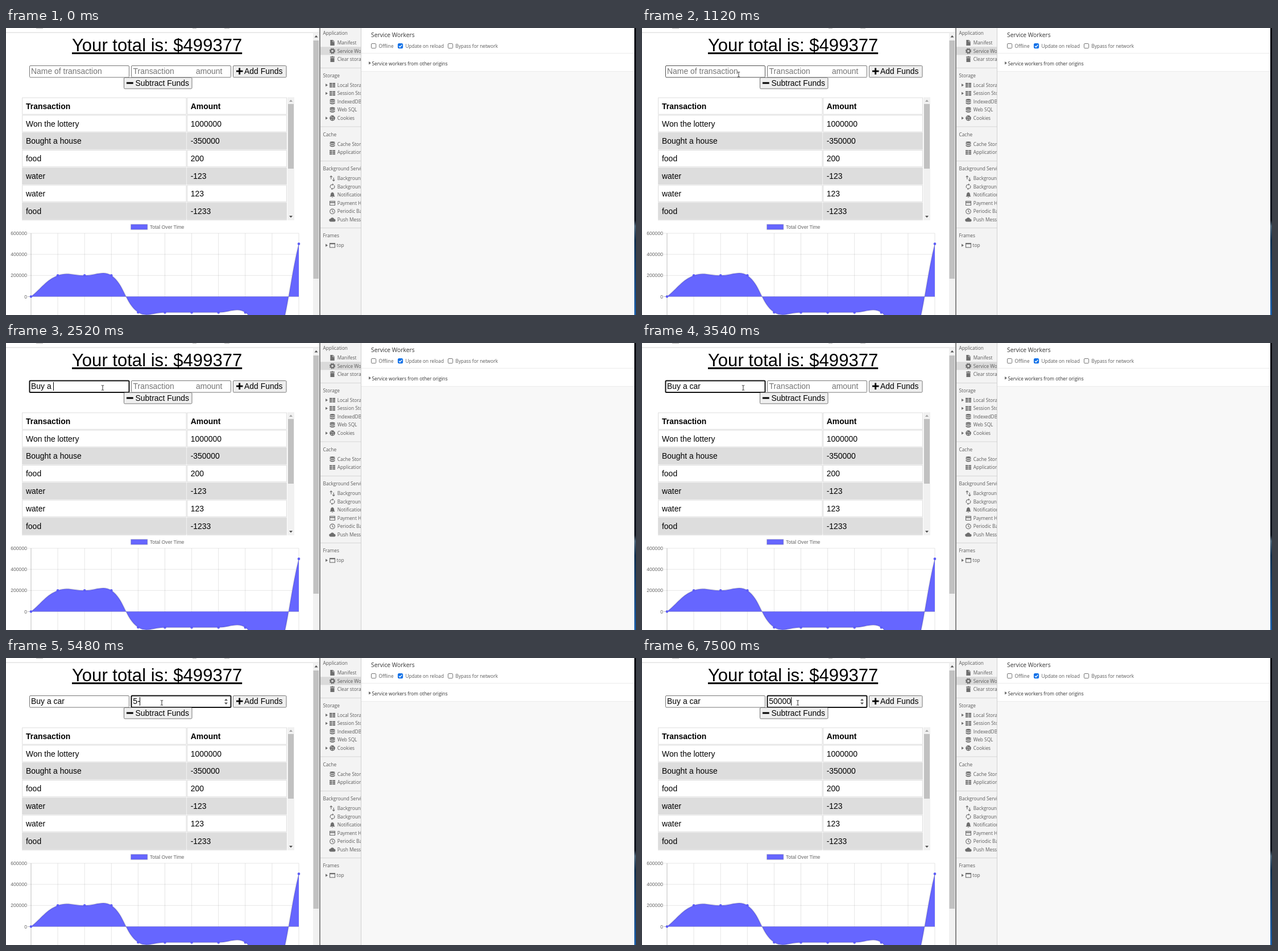
Animation of 1108 by 506 pixels, one loop 8000 ms. Source, as an HTML page:

```html
<!DOCTYPE html>
<html lang="en">
<head>
<meta charset="utf-8">
<title>Budget tracker</title>
<style>
html, body { margin: 0; width: 100%; height: 100%; overflow: hidden; background: #fff; }
svg { display: block; width: 1108px; height: 506px; }
text { font: 13.95px "Liberation Sans", Arial, sans-serif; white-space: pre; }
.title { font-size: 31.05px; text-decoration: underline; }
.bold { font-weight: bold; }
.hint { fill: #757575; }
.chart { font-size: 8.65px; fill: #666; }
.tool { font: 8.3px "Open Sans", "Noto Sans", sans-serif; fill: #5a5a5a; }
.dark { fill: #333; }
.head { font-size: 10.3px; fill: #333; }
.icon { fill: #6e6e6e; }
.line { fill: none; stroke: #6e6e6e; stroke-width: 1.1; }
.box { fill: #fff; stroke: #767676; }
.button { fill: #efefef; stroke: #767676; }
</style>
</head>
<body>
<svg viewBox="0 0 1108 506" xmlns="http://www.w3.org/2000/svg">
  <defs>
    <clipPath id="sideClip"><rect x="553" width="71" height="506"/></clipPath>
    <linearGradient id="desk" x2="0" y2="1">
      <stop offset="0" stop-color="#0b0d14"/><stop offset=".67" stop-color="#10151f"/>
      <stop offset=".69" stop-color="#4c6478"/><stop offset=".74" stop-color="#12304f"/>
      <stop offset="1" stop-color="#1d5fa8"/>
    </linearGradient>
  </defs>

  <rect width="1108" height="506" fill="#fff"/>
  <path d="M0 8h551" stroke="#d4d4d4"/>
  <path d="M53 0h12M328 0h7M384 0h9" stroke="#777"/>
  <text class="title" x="116" y="41">Your total is: $499377</text>

  <rect class="box" id="box1" x="41.5" y="66.5" width="175" height="20.5" rx="1.5"/>
  <rect class="box" id="box2" x="220.5" y="66.5" width="175" height="20.5" rx="1.5"/>
  <text class="hint" id="hint1" x="44" y="81.3">Name of transaction</text>
  <g class="hint" id="hint2"><text x="223.5" y="81.3">Transaction</text><text x="334" y="81.3">amount</text></g>
  <text id="field1" x="44" y="81.3"></text>
  <text id="field2" x="223.3" y="81.3"></text>
  <path id="spin" d="M384 75.2l3-3.4 3 3.4zM384 78.6l3 3.4 3-3.4z" fill="#505050"/>
  <rect class="button" x="399.5" y="66.5" width="93.5" height="20.5" rx="1.5"/>
  <rect class="button" x="207.5" y="87.5" width="119.5" height="19.5" rx="1.5"/>
  <path d="M405 76.2h11.5M410.7 70.5v11.5M212 97h11.7" stroke="#000" stroke-width="2.8"/>
  <text x="419" y="81.3">Add Funds</text>
  <text x="227.5" y="102.3">Subtract Funds</text>

  <g id="table"></g>
  <rect x="495" y="122" width="12" height="217" fill="#f1f1f1"/>
  <rect id="thumb1" x="496" y="134" width="10" height="114"/>
  <path d="M498 130l3-3.4 3 3.4z" fill="#a3a3a3"/>
  <path d="M498 331l3 3.4 3-3.4z" fill="#505050"/>

  <g id="chart"></g>

  <rect x="540" y="8.5" width="11" height="498" fill="#f1f1f1"/>
  <rect id="thumb2" x="540.5" y="22" width="9.5" height="420"/>
  <path d="M542.5 16.5l3-3.5 3 3.5z" fill="#505050"/>

  <rect x="551" width="2" height="506" fill="#858585"/>
  <rect x="553" width="71" height="506" fill="#f3f3f3"/>
  <g id="side" clip-path="url(#sideClip)"></g>
  <rect x="625" y="77" width="480" height="429" fill="#f8f8f8"/>
  <path d="M624.5 0v506" stroke="#d0d0d0"/>
  <path d="M625 44.5h480M625 76.5h480" stroke="#ececec"/>
  <text class="tool head" x="642" y="16">Service Workers</text>
  <g id="checks"></g>
  <path class="icon" d="M638 59l4 2.7-4 2.7z"/>
  <text class="tool dark" x="643.5" y="65.6">Service workers from other origins</text>
  <rect x="1105" width="3" height="506" fill="url(#desk)"/>

  <circle id="click" r="9" fill="#fff04a" style="mix-blend-mode:multiply"/>
  <path id="caret" d="M0 69v15" stroke="#000"/>
  <g id="pointer">
    <path data-kind="arrow" d="M0 0v12l2.8-2.6 1.9 4.3 1.9-.8-1.9-4.2h3.8z" fill="#fff" stroke="#000" stroke-width=".8"/>
    <path data-kind="beam" d="M-2.2 -4.2h1.7l.5 .5 .5-.5h1.7M0 -4v8M-2.2 4.2h1.7l.5-.5 .5 .5h1.7" fill="none" stroke="#333" stroke-width="1"/>
    <path data-kind="resize" d="M-7 0l3-3v2h8v-2l3 3-3 3v-2h-8v2z" fill="#000" stroke="#fff" stroke-width=".6"/>
  </g>
</svg>
<script>
const $ = id => document.getElementById(id);
const label = (cls, x, y, s, extra = '') => `<text class="${cls}" x="${x}" y="${y}" ${extra}>${s}</text>`;

// Transactions
const rows = [['Transaction', 'Amount'], ['Won the lottery', '1000000'], ['Bought a house', '-350000'],
  ['food', '200'], ['water', '-123'], ['water', '123'], ['food', '-1233']];
$('table').innerHTML = rows.map(([name, amount], i) => {
  const y = 123 + i * 30.83, fill = i && i % 2 === 0 ? '#ddd' : '#fff', cls = i ? '' : 'bold';
  const cell = (x, w) => `<rect x="${x}" y="${y}" width="${w}" height="29.2" fill="${fill}" stroke="#ddd"/>`;
  return cell(28.7, 288.3) + cell(318.7, 174.8) + label(cls, 35, y + 19.7, name) + label(cls, 324.7, y + 19.7, amount);
}).join('') + '<path d="M28 338.5h289M318 338.5h176" stroke="#ddd"/>';

// Area chart with tension-0.4 spline
const colX = i => 44 + i * 47.1, rowY = v => 473.5 - v / 200000 * 37.2;
const totals = [0, 200000, 200000, 200200, -149590, -150823, -150700, -150823, -150623, -500623, 499377];
const pts = totals.map((v, i) => [colX(i), rowY(v)]);
const ctrl = pts.map((p, i) => {
  const a = pts[i - 1] || p, b = pts[i + 1] || p;
  const da = Math.hypot(p[0] - a[0], p[1] - a[1]), db = Math.hypot(b[0] - p[0], b[1] - p[1]);
  const at = k => [0, 1].map(j => p[j] + .4 * k / (da + db) * (b[j] - a[j]));
  return [at(-da), at(db)];
});
const curve = `M${pts[0]}` + pts.slice(1).map((p, i) => `C${ctrl[i][1]} ${ctrl[i + 1][0]} ${p}`).join('');
let chart = '';
for (let i = 0; i < 11; i++) chart += `<path d="M${colX(i)} 362V506" stroke="#000" stroke-opacity="${i ? .1 : .25}"/>`;
[600000, 400000, 200000, 0].forEach(v => {
  const y = rowY(v);
  chart += `<path d="M38 ${y}H515" stroke="#000" stroke-opacity="${v ? .1 : .25}"/>` + label('chart', 37, y + 3, v, 'text-anchor="end"');
});
chart += `<path d="${curve}V473.5H44z" fill="#66f"/><path d="${curve}" fill="none" stroke="#000" stroke-opacity=".1" stroke-width="2.2"/>`;
chart += pts.map(([x, y]) => `<circle cx="${x}" cy="${y}" r="2.3" fill="#5c5cf6"/>`).join('');
chart += '<rect x="219.7" y="346.3" width="29" height="9" fill="#66f" stroke="#000" stroke-opacity=".1" stroke-width="2"/>';
$('chart').innerHTML = chart + label('chart', 253, 353.6, 'Total Over Time');

// Tool sidebar; icons are drawn around their centre
const grid = '<path class="icon" d="M-5-4h4.6v2.2h-4.6zM.4-4h4.6v2.2h-4.6zM-5-1.1h4.6v2.2h-4.6zM.4-1.1h4.6v2.2h-4.6zM-5 1.8h4.6v2.2h-4.6zM.4 1.8h4.6v2.2h-4.6z"/>';
const stack = '<ellipse class="icon" cy="-3.2" rx="4.5" ry="1.7"/><path class="icon" d="M-4.5-2q4.5 3 9 0v2q-4.5 3-9 0zM-4.5 1.2q4.5 3 9 0v2q-4.5 3-9 0z"/>';
const icons = {
  file: '<path class="icon" d="M-3.7-5h4.7l2.7 2.8v7.2h-7.4z"/><path d="M.8-4.4v2.7h2.7" fill="none" stroke="#f3f3f3" stroke-width=".7"/>',
  gear: '<circle r="3" fill="none" stroke="#6e6e6e" stroke-width="2.2"/><circle r="4.5" fill="none" stroke="#6e6e6e" stroke-width="1.4" stroke-dasharray="2 1.53"/>',
  bin: '<path class="icon" d="M-4-4.5h2.3l.7-.8h2l.7 .8h2.3v1.3h-8zM-3.5-2.4h7v7.4h-7z"/>',
  grid, stack,
  cookie: '<circle class="icon" r="4.8"/><path d="M-2-2h.1M1.5 2h.1M-1.7 2h.1M1 -1h.1M3.5-3.5h.1" stroke="#f3f3f3" stroke-width="1.6" stroke-linecap="round"/>',
  swap: '<path class="line" d="M-2.2 1.5v-6M-4.2-2.4l2-2 2 2M2.2-1.5v6M.2 2.4l2 2 2-2"/>',
  sync: '<path class="line" d="M-3.2 2.2A3.8 3.8 0 0 1 .5-3.7M3.2-2.2A3.8 3.8 0 0 1-.5 3.7"/><path class="icon" d="M0-5.6l2.6 1.9-2.6 1.9zM0 5.6l-2.6-1.9 2.6-1.9z"/>',
  bell: '<path class="icon" d="M-4.2 3v-.8l1.1-1.2v-2.4q.4-2.5 3.1-3.4 2.7 .9 3.1 3.4v2.4l1.1 1.2v.8zM-1.2 3.7h2.4q-1.2 2-2.4 0z"/>',
  card: '<rect class="line" x="-4.5" y="-3.4" width="9" height="7"/><path class="icon" d="M-4.5-2h9v1.8h-9z"/>',
  clock: '<circle class="line" r="4.3"/><path class="line" d="M0-2.6v2.8l2 1.2"/>',
  cloud: '<path class="icon" d="M-3 3.5a2.6 2.6 0 0 1-.3-5.2 3.6 3.6 0 0 1 6.6 .6 2.3 2.3 0 0 1 0 4.6z"/>',
  frame: '<rect class="line" x="-4.5" y="-3.7" width="9" height="7.4"/><path class="icon" d="M-4.5-3.7h9v1.8h-9z"/>'
};
// A leading ">" marks an expandable item
const groups = [
  [8.5, 26, 'Application', 'file Manifest|gear Service Workers|bin Clear storage'],
  [83.7, 100.7, 'Storage', '>grid Local Storage|>grid Session Storage|stack IndexedDB|stack Web SQL|>cookie Cookies'],
  [187.7, 204.8, 'Cache', 'stack Cache Storage|grid Application Cache'],
  [247.8, 265.2, 'Background Services', 'swap Background Fetch|sync Background Sync|bell Notifications|card Payment Handler|clock Periodic Background|cloud Push Messaging'],
  [365.8, 383.2, 'Frames', '>frame top']
];
let side = '<path d="M553 33.2h71v14.4h-71z" fill="#dadada"/><path d="M553 70.5h71M553 174h71M553 234.5h71M553 352.5h71" stroke="#d6d6d6"/>';
for (const [y, first, title, list] of groups) {
  side += label('tool', 557.5, y + 3, title);
  list.split('|').forEach((item, i) => {
    const [, open, icon, name] = item.match(/^(>?)(\w+) (.*)/), cy = first + i * 14.55;
    side += `<g transform="translate(574 ${cy})">${icons[icon]}${open && '<path class="icon" d="M-12-2.6l4 2.6-4 2.6z"/>'}</g>`;
    side += label('tool', icon === 'frame' ? 581.5 : 582.7, cy + 3, name);
  });
}
$('side').innerHTML = side;

$('checks').innerHTML = [[642.5, 'Offline'], [689.5, 'Update on reload'], [777.5, 'Bypass for network']].map(([x, s], i) =>
  `<rect x="${x}" y="27.5" width="8.2" height="8.2" rx="1.5" fill="${i === 1 ? '#0b6fe8' : '#fff'}" stroke="${i === 1 ? '#0b6fe8' : '#767676'}"/>` +
  (i === 1 ? `<path d="M${x + 1.5} 31.8l1.9 2 3.4-4.2" fill="none" stroke="#fff" stroke-width="1.4"/>` : '') +
  label('tool', x + 13, 34.7, s)).join('');

// Timeline
const typed1 = [[0, ''], [1750, 'B'], [1980, 'Bu'], [2130, 'Buy'], [2210, 'Buy '], [2440, 'Buy a'], [2520, 'Buy a '],
  [2670, 'Buy a c'], [2750, 'Buy a ca'], [2990, 'Buy a car']];
const typed2 = [[0, ''], [4850, '5'], [5020, '5-+'], [5480, '5-'], [5560, '5'], [6100, '50'], [6580, '500'], [6730, '5000'], [7500, '50000']];
const latest = (list, t) => list.filter(k => k[0] <= t).pop()[1];
const within = (t, a, b) => t >= a && t < b;

function pointerAt(t) {
  if (t < 200) return null;
  if (t < 280) return [500, 205];
  if (t < 510) return [552, 215];
  if (t < 1194) {
    const k = Math.min(1, Math.floor((t - 510) / 76) / 8), e = k * k * (3 - 2 * k);
    return [555 - 385 * e, 225 - 143 * e];
  }
  if (t < 3540) return [170, 79];
  const k = Math.min(1, Math.floor((t - 3540) / 75.5) / 7), e = k * k * (3 - 2 * k);
  return [178 + 96 * e, 79 + 15 * Math.sin(Math.PI * e)];
}

const show = (el, on) => el.setAttribute('visibility', on ? 'visible' : 'hidden');
const shapes = [...$('pointer').children];

function draw(t) {
  const p = pointerAt(t), [x, y] = p || [-99, -99];
  const inside = (x0, x1, y0, y1) => x >= x0 && x <= x1 && y >= y0 && y <= y1;
  const focus = t < 1194 ? 0 : t < 4068 ? 1 : 2;
  const over = [inside(41, 217, 66, 87), inside(220, 396, 66, 87)];

  [1, 2].forEach(n => {
    const box = $('box' + n), on = focus === n;
    box.setAttribute('stroke-width', on ? 2 : 1);
    box.style.stroke = on ? '#101010' : over[n - 1] ? '#4f4f4f' : '#767676';
  });
  show($('spin'), focus === 2 || over[1]);
  $('thumb1').setAttribute('fill', inside(495, 507, 134, 248) ? '#a8a8a8' : '#c1c1c1');
  $('thumb2').setAttribute('fill', inside(540, 551, 22, 442) ? '#a8a8a8' : '#c1c1c1');

  const texts = [latest(typed1, t), latest(typed2, t)];
  texts.forEach((s, i) => {
    $('field' + (i + 1)).textContent = s;
    show($('hint' + (i + 1)), !s);
  });
  const blink = within(t, 3540, 4068) || within(t, 4620, 4850) || within(t, 7340, 7500);
  show($('caret'), focus && !blink);
  if (focus) {
    const width = texts[focus - 1] ? $('field' + focus).getComputedTextLength() : 0;
    $('caret').setAttribute('transform', `translate(${Math.floor((focus === 1 ? 44 : 223.3) + width) + .5} 0)`);
  }

  show($('click'), within(t, 1194, 1350) || within(t, 4068, 4240));
  $('click').setAttribute('cx', focus === 1 ? 168 : 273);
  $('click').setAttribute('cy', 78.5);

  const kind = !p ? '' : over[0] || over[1] ? 'beam' : within(t, 280, 510) ? 'resize' : 'arrow';
  $('pointer').setAttribute('transform', `translate(${x} ${y})`);
  shapes.forEach(s => show(s, s.dataset.kind === kind));
}

const start = performance.now();
function tick() {
  draw((performance.now() - start) % 8000);
  requestAnimationFrame(tick);
}
tick();
</script>
</body>
</html>
```
